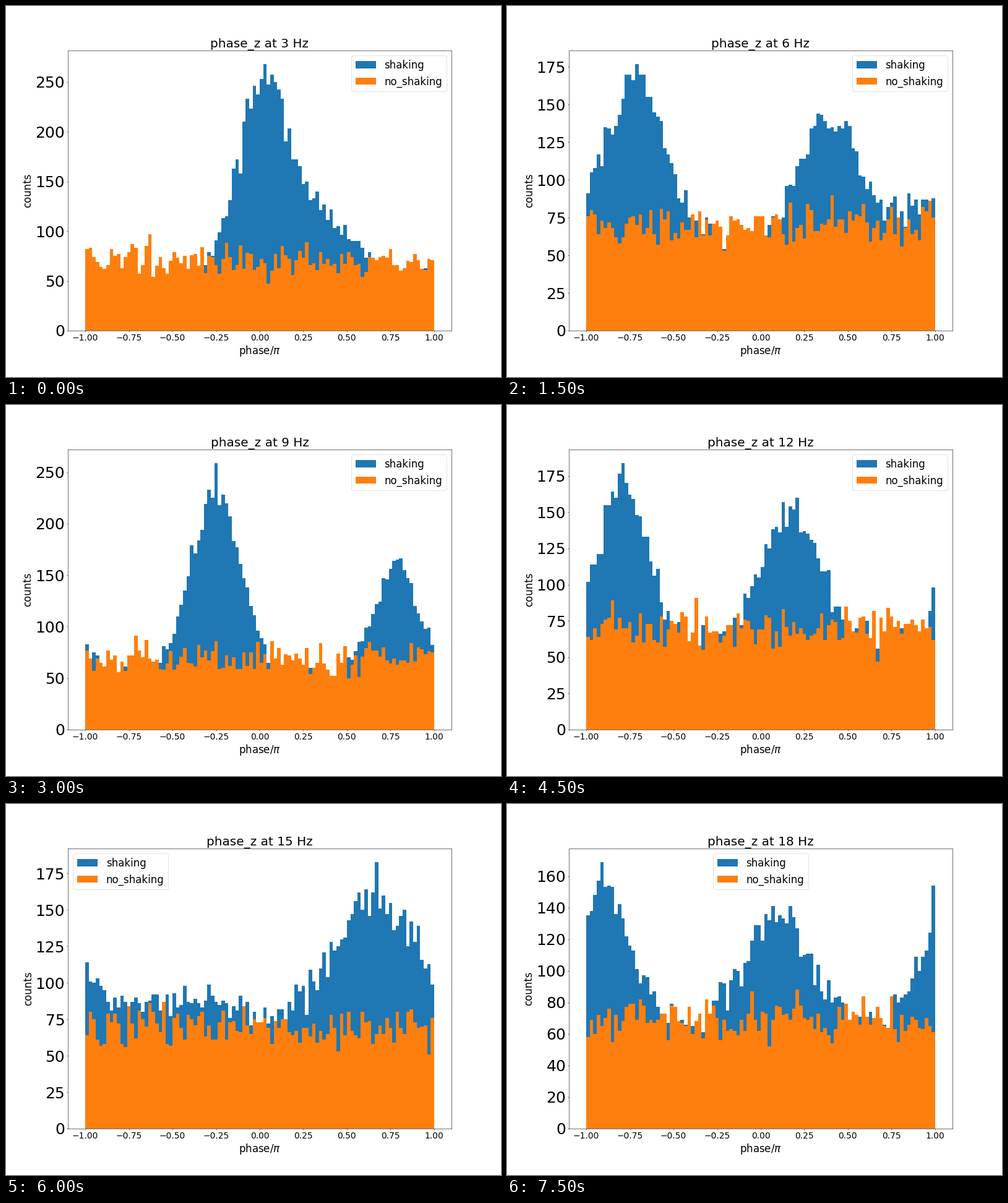
A matplotlib script that plays this animation: 800 px wide and 600 px high, repeating every 8000 ms.

```python
import numpy as np
import matplotlib.pyplot as plt
from matplotlib.animation import FuncAnimation

plt.rcParams.update({
    "font.family": "DejaVu Sans",
    "font.size": 24,
    "xtick.labelsize": 20,
    "ytick.labelsize": 36,
})

BINS = 100
STEPS = 16
HOLD = 3  # steps of 500 ms per histogram
NOISE_MEAN = 70

EDGES = np.linspace(-1, 1, BINS + 1)
MIDS = (EDGES[:-1] + EDGES[1:]) / 2

# Tallest count, floor, then bumps as (phase, height, width)
SCENES = [
    (268, 52, [(0.03, 200, 0.15), (0.40, 60, 0.15)]),
    (177, 62, [(-0.71, 108, 0.15), (0.40, 76, 0.18), (0.95, 20, 0.15)]),
    (259, 56, [(-0.25, 172, 0.14), (0.79, 105, 0.13)]),
    (184, 60, [(-0.79, 112, 0.14), (0.17, 92, 0.16)]),
    (183, 70, [(0.66, 86, 0.24), (-0.45, 18, 0.30)]),
    (169, 66, [(-0.90, 85, 0.16), (0.10, 68, 0.19)]),
]


def bump(center, height, width):
    """Gaussian on the phase circle, which wraps from 1 to -1."""
    dist = (MIDS - center + 1) % 2 - 1
    return height * np.exp(-0.5 * (dist / width) ** 2)


def make_counts(k):
    rng = np.random.default_rng(40 + k)
    top, floor, bumps = SCENES[k]
    mean = floor + sum(bump(*b) for b in bumps)
    shaking = np.round(rng.normal(mean, 0.7 * np.sqrt(mean)))
    shaking = np.minimum(shaking, 0.96 * top)
    shaking[mean.argmax()] = top
    return shaking, rng.poisson(NOISE_MEAN, BINS)


DATA = [make_counts(k) for k in range(len(SCENES))]

fig, ax = plt.subplots(figsize=(16, 12), dpi=50)
fig.subplots_adjust(left=0.125, right=0.9, bottom=0.125, top=0.88)


def draw(step):
    k = step // HOLD
    ax.clear()
    for counts, label in zip(DATA[k], ("shaking", "no_shaking")):
        ax.hist(MIDS, bins=EDGES, weights=counts, label=label)
    ax.set_title(f"phase_z at {3 * (k + 1)} Hz")
    ax.set_xlabel(r"phase/$\pi$")
    ax.set_ylabel("counts")
    ax.legend(loc="best")
    return []


anim = FuncAnimation(fig, draw, frames=STEPS, interval=500,
                     init_func=lambda: draw(0), repeat=True, repeat_delay=0)
plt.show()
```
